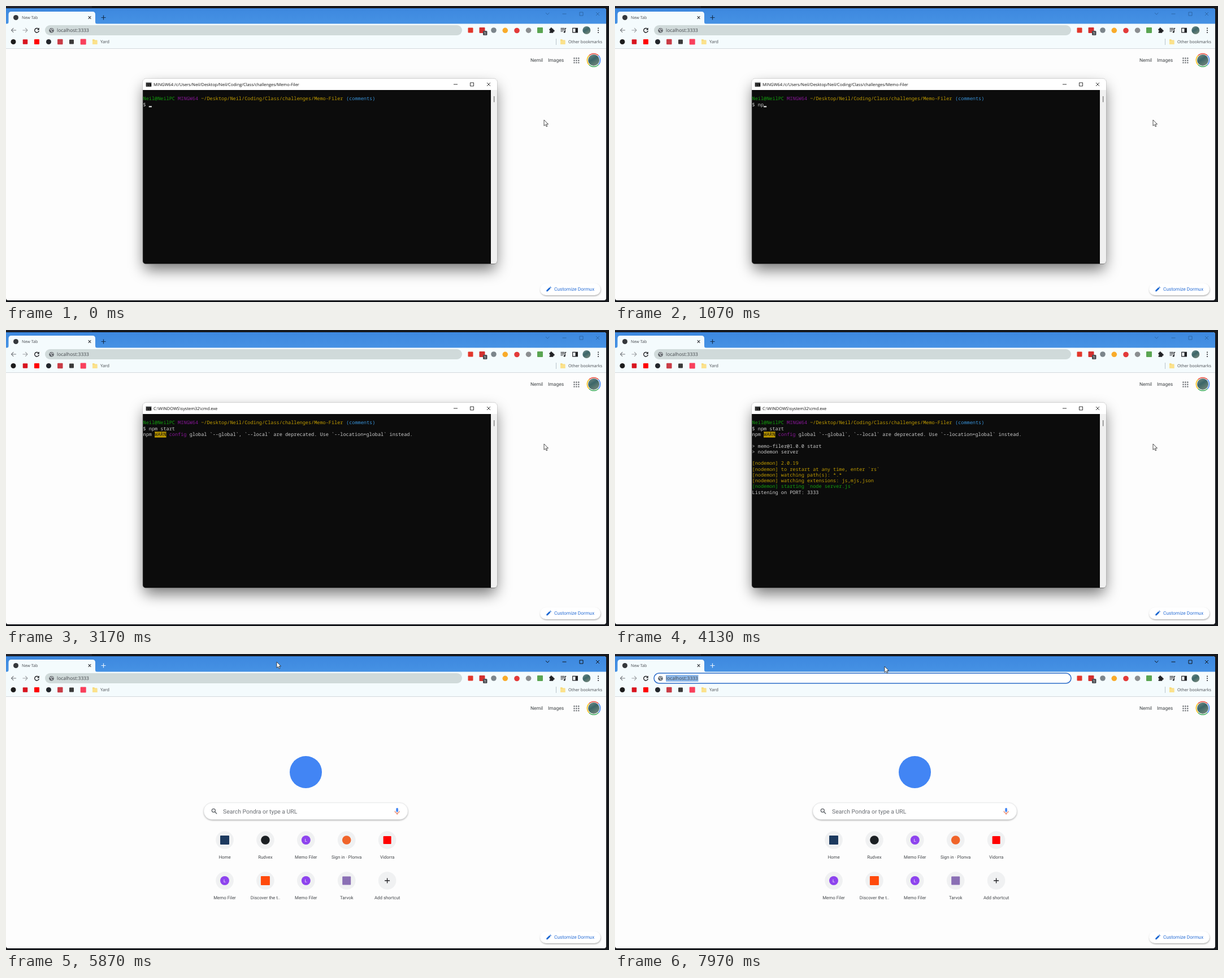
An HTML page that plays this animation: 1067x525 px, repeating every 8 s.

```html
<!DOCTYPE html>
<html lang="en">
<head>
<meta charset="utf-8">
<title>Terminal and browser</title>
<style>
html, body { margin: 0; width: 100%; height: 100%; overflow: hidden; background: #16181c; }
svg { display: block; width: 1067px; height: 525px; }
text { white-space: pre; text-rendering: geometricPrecision; }
.ui { font-family: "Open Sans", "Noto Sans", sans-serif; }
.page { font-family: Roboto, Arial, sans-serif; }
.mono { font: 8.56px "Noto Sans Mono", "DejaVu Sans Mono", monospace; }
</style>
</head>
<body>
<svg id="stage" viewBox="0 0 1067 525"></svg>
<script>
const LOOP = 8000;
const ENTER = 2350, FRONT = 5560, FOCUS = 7200;
const COL = 5.136, ROW = 10.28, LEFT = 242.5, BASE = 167.4;
const GREEN = '#13a10e', PURPLE = '#881798', YELLOW = '#c19c00', BLUE = '#3a96dd', WHITE = '#cccccc';

const rect = (x, y, w, h, fill, r = 0, more = '') =>
  `<rect x="${x}" y="${y}" width="${w}" height="${h}" rx="${r}" fill="${fill}" ${more}/>`;
const disc = (x, y, r, fill, more = '') =>
  `<circle cx="${x}" cy="${y}" r="${r}" fill="${fill}" ${more}/>`;
const line = (d, stroke, w = 1, more = '') =>
  `<path d="${d}" fill="none" stroke="${stroke}" stroke-width="${w}" ${more}/>`;
const shape = (d, fill, more = '') => `<path d="${d}" fill="${fill}" ${more}/>`;
const text = (x, y, s, size, fill, cls = 'ui', more = '') =>
  `<text x="${x}" y="${y}" font-size="${size}" fill="${fill}" class="${cls}" ${more}>${s}</text>`;
const square = (x, y, size, fill) => rect(x - size / 2, y - size / 2, size, size, fill, 1);
const group = (id, body) => `<g id="${id}">${body}</g>`;

const defs = `<defs>
  <linearGradient id="photo" x2=".6" y2="1">
    <stop offset="0" stop-color="#77918c"/><stop offset=".5" stop-color="#3c6668"/><stop offset="1" stop-color="#6d8378"/>
  </linearGradient>
  <linearGradient id="bar" y2="1" x2="0">
    <stop offset="0" stop-color="#3d88df"/><stop offset="1" stop-color="#4692e4"/>
  </linearGradient>
  <filter id="deep" x="-20%" y="-20%" width="140%" height="150%"><feGaussianBlur stdDeviation="13"/></filter>
  <filter id="soft" x="-10%" y="-40%" width="120%" height="190%"><feGaussianBlur stdDeviation="1.5"/></filter>
</defs>`;

function folder(x) {
  return shape(`M${x - 4} 59.2h3.2l1.2 1.2h4v7.6h-8.4z`, '#f6d773') + rect(x - 4, 61.2, 8.4, 6.8, '#fbe28c', .5);
}

function winButtons(color) {
  return line('M955 12l3.2 3.2 3.2-3.2M984.5 14h7M1015 11h6v6h-6zM1044 11l6 6M1050 11l-6 6', color, 1);
}

function toolbarIcons() {
  const dark = '#202124';
  return square(822, 43, 9, '#e2372b') +
    square(842.5, 43, 10, '#d3302f') + rect(844, 44, 7.5, 8, '#4a4d52', 1.5) +
    text(847.8, 50.6, '1', 7, '#fff', 'page', 'text-anchor="middle"') +
    disc(863, 43, 4.8, '#7c858b') + disc(883.3, 43.3, 4.8, '#f9ab2a') + disc(904, 43.5, 4.8, '#e33a3a') +
    disc(924.6, 43.2, 4.8, '#8b8e90') + square(945, 43, 10, '#5aa552') +
    rect(961.5, 40.3, 7, 7.4, dark, 1) + disc(964.8, 39.9, 1.7, dark) + disc(969, 44, 1.7, dark) +
    disc(961.6, 44.4, 1.2, '#f4fbfc') +
    line('M981.5 39.7h6.5M981.5 42.3h6.5M981.5 45h4M989.3 46V39.6h2', dark, 1.2) + disc(988.2, 46, 1.6, dark) +
    line('M1002.7 39.3h8.6v7.6h-8.6z', dark, 1.2) + rect(1007.5, 39, 4, 8, dark) +
    disc(1027.3, 43, 7, 'url(#photo)') +
    [39.5, 43.2, 46.9].map(y => disc(1048, y, 1, dark)).join('');
}

function bookmarks() {
  return disc(13, 63.5, 4.5, '#1c1c1c') + square(34, 63.5, 8.5, '#d8141f') + square(54.5, 63.5, 9, '#f00') +
    disc(75.5, 63.5, 4.5, '#22252b') + square(95.8, 63.5, 9.5, '#c93c46') + square(116, 63.5, 8, '#3a3a3a') +
    square(136.7, 63.5, 10, '#f9405c') + folder(157) +
    text(167, 66.3, 'Yard', 7.7, '#45494e') +
    rect(973, 58, 1, 11, '#b9c4cb') + folder(985) + text(995, 66.2, 'Other bookmarks', 7.3, '#45494e');
}

function frame() {
  const grey = '#5f6368';
  return rect(0, 0, 1067, 525, '#16181c') + rect(0, 0, 152, 3, '#24252e') +
    shape('M0 4H1058q4 0 4 4V518q0 4-4 4H4q-4 0-4-4z', '#fdfdfd') +
    shape('M0 4H1058q4 0 4 4V32H0z', 'url(#bar)') +
    rect(0, 31.5, 1062, 43.5, '#f4fbfd') + rect(0, 75, 1062, 1, '#d3d9dd') +
    shape('M1 32q3.5 0 3.5-4V15q0-5 5-5H153q5 0 5 5v13q0 4 3.5 4z', '#f4fbfd') +
    disc(17.5, 20.5, 4.5, '#35383c') + text(28, 23.1, 'New Tab', 7.15, '#45494e') +
    line('M145.7 18.2l4.6 4.6M150.3 18.2l-4.6 4.6', '#303338', 1.1) +
    line('M18 43H9.5M13.3 39.2L9.5 43l3.8 3.8', '#74787d', 1.1) +
    line('M29.5 43H38M34.2 39.2L38 43l-3.8 3.8', '#9a9ea2', 1.1) +
    line('M57.3 40.6a3.8 3.8 0 1 0 1 3.2', '#202124', 1.4) + shape('M58.8 38.6v3.9h-3.9z', '#202124') +
    rect(69, 34, 738, 18, '#d0dada', 9, 'id="pill"') +
    rect(90, 37, 57.5, 12, '#8db7e8', 0, 'id="marked"') +
    disc(80.5, 43.2, 4.3, grey) + line('M77.5 41.2q2 .2 2.3 2t2.4 2.8M81 39.6q-.6 2 2.8 2.4', '#dfe5e6', 1.2) +
    text(90, 46, 'localhost:3333', 8.45, '#404448') +
    toolbarIcons() + bookmarks() +
    text(928, 99, 'Nemil', 8.5, '#3c4043', 'page') + text(959, 99, 'Images', 8.5, '#3c4043', 'page') +
    Array.from({ length: 9 }, (_, i) =>
      rect(1004.4 + i % 3 * 3.9, 91.6 + Math.floor(i / 3) * 3.9, 2.2, 2.2, grey, .4)).join('') +
    ['#ea4335', '#4285f4', '#34a853', '#fbbc04'].map((c, i) =>
      line('M1031.8 87.8A11.6 11.6 0 0 1 1048.2 87.8', c, 1.5, `transform="rotate(${i * 90} 1040 96)"`)).join('') +
    disc(1040, 96, 10, 'url(#photo)') +
    rect(946, 494, 106, 20, '#0006', 10, 'filter="url(#soft)"') + rect(945, 492, 107, 21, '#fff', 10.5) +
    shape('M956.3 506.2v-2l5.3-5.3 2 2-5.3 5.3zM962.2 498.3l.9-.9 2 2-.9.9z', '#1a67d2') +
    text(970, 505.2, 'Customize Dormux', 8.4, '#2a6fd6', 'page');
}

function shortcuts() {
  const violet = '#8e44ee';
  const letter = (x, y) => disc(x, y, 8, violet) +
    text(x, y + 2.6, 'L', 7.4, '#fff', 'page', 'text-anchor="middle"');
  const box = (color, size = 15) => (x, y) => square(x, y, size, color);
  const dot = color => (x, y) => disc(x, y, 7.8, color);
  const items = [
    ['Home', box('#1d3a5f', 16)], ['Rudvex', dot('#1b1f23')], ['Memo Filer', letter],
    ['Sign in · Plonva', dot('#f0642a')], ['Vidorra', box('#f00', 14)],
    ['Memo Filer', letter], ['Discover the t..', box('#ff4a0c', 16)], ['Memo Filer', letter],
    ['Tarvok', box('#8a6fb4')],
    ['Add shortcut', (x, y) => line(`M${x - 4.5} ${y}h9M${x} ${y - 4.5}v9`, '#202124', 1.3)]
  ];
  return items.map(([name, icon], i) => {
    const x = 387 + i % 5 * 71.9, y = 330 + Math.floor(i / 5) * 72;
    return disc(x, y, 15.8, '#f0f1f2') + icon(x, y) +
      text(x, y + 33, name, 7.9, '#45484c', 'page', 'text-anchor="middle"');
  }).join('');
}

function newTab() {
  return disc(530.5, 209.5, 28.5, '#4285f4') +
    rect(350, 265, 361, 30, '#0005', 15, 'filter="url(#soft)"') +
    rect(350, 264, 361, 29.5, '#fff', 14.7, 'stroke="#e4e6e8" stroke-width=".6"') +
    disc(367.3, 277.6, 3, 'none', 'stroke="#5f6368" stroke-width="1.3"') + line('M369.5 279.8l3.6 3.6', '#5f6368', 1.4) +
    text(384, 282.7, 'Search Pondra or type a URL', 10.4, '#6a6e73', 'page') +
    rect(690.3, 273, 3.6, 7.4, '#4285f4', 1.8) +
    line('M688.3 278.4a3.8 3.8 0 0 0 7.6 0M692.1 282.2v2.8', '#e0603f', 1.1) +
    shortcuts();
}

// Each row: time shown, row number, runs of text and colour.
const rows = [
  [0, 0, ['Neil@NeilPC', GREEN], [' MINGW64', PURPLE],
    [' ~/Desktop/Neil/Coding/Class/challenges/Memo-Filer', YELLOW], [' (comments)', BLUE]],
  [0, 1, ['$ ', WHITE]],
  [2800, 2, ['npm ', WHITE], ['WARN', '#0c0c0c', YELLOW], [' config', PURPLE],
    [' global `--global`, `--local` are deprecated. Use `--location=global` instead.', WHITE]],
  [3250, 4, ['&gt; memo-filer@1.0.0 start', WHITE]],
  [3250, 5, ['&gt; nodemon server', WHITE]],
  [3600, 7, ['[nodemon] 2.0.19', YELLOW]],
  [3600, 8, ['[nodemon] to restart at any time, enter `rs`', YELLOW]],
  [3600, 9, ['[nodemon] watching path(s): *.*', YELLOW]],
  [3600, 10, ['[nodemon] watching extensions: js,mjs,json', YELLOW]],
  [3600, 11, ['[nodemon] starting `node server.js`', GREEN]],
  [3900, 12, ['Listening on PORT: 3333', WHITE]]
];

function terminalRow([time, row, ...runs]) {
  let col = 0;
  const y = BASE + row * ROW;
  const body = runs.map(([s, color, back]) => {
    const x = LEFT + col * COL;
    col += s.length;
    return (back ? rect(x, y - 7.6, s.length * COL, ROW, back) : '') +
      `<text x="${x}" y="${y}" class="mono" fill="${color}">${s}</text>`;
  }).join('');
  return `<g class="row" data-time="${time}">${body}</g>`;
}

function terminal() {
  return rect(244, 142, 623, 326, '#0008', 8, 'filter="url(#deep)"') +
    rect(242, 129, 627, 328.5, '#0c0c0c', 5, 'stroke="#8a8a8a" stroke-width=".5"') +
    shape('M242 149V134q0-5 5-5H864q5 0 5 5v15z', '#fff') +
    shape('M858 149h11v303q0 5-5 5h-6z', '#f0f0f0') + rect(863, 160, 1.3, 10.5, '#777') +
    rect(247.7, 135.2, 9.6, 7.8, '#111', .5) + rect(247.7, 135.2, 9.6, 1.4, '#b5b8ba') +
    text(248.8, 141.6, 'C:\\', 4.5, '#eee') +
    text(261, 141.8, '', 7.42, '#111', 'ui', 'id="caption"') +
    line('M792 139h7M821.5 136h6v6h-6zM851 136l6 6M857 136l-6 6', '#222', .9) +
    rows.map(terminalRow).join('') +
    `<text id="typed" x="${LEFT + 2 * COL}" y="${BASE + ROW}" class="mono" fill="${WHITE}"></text>` +
    rect(0, 0, COL, 2, '#f2f2f2', 0, 'id="caret"');
}

function pointers() {
  return group('arrow', shape('M0 0V10.5L2.5 8.3 4.2 12 5.8 11.3 4.2 7.6H7.5z', '#fff',
      'stroke="#222" stroke-width=".8" stroke-linejoin="round"')) +
    group('beam', line('M-2-4.5q2 0 2 1.2v6.6q0 1.2-2 1.2M2-4.5q-2 0-2 1.2M0 3.3q0 1.2 2 1.2', '#333', .9));
}

document.getElementById('stage').innerHTML = defs + frame() +
  group('dim', winButtons('#2c67a8') + line('M168.5 20.5h8M172.5 16.5v8', '#14304f', 1.2)) +
  group('lit', winButtons('#101418') + line('M168.5 20.5h8M172.5 16.5v8', '#eaf3fd', 1.2)) +
  group('home', newTab()) + group('terminal', terminal()) + pointers();

const el = Object.fromEntries([...document.querySelectorAll('[id]')].map(e => [e.id, e]));
const rowEls = [...document.querySelectorAll('.row')];
const show = (e, on) => e.setAttribute('visibility', on ? 'inherit' : 'hidden');
const set = (e, values) => { for (const k in values) e.setAttribute(k, values[k]); };

const command = 'npm start';
const keyTimes = [900, 1020, 1130, 1260, 1400, 1510, 1630, 1750, 1880];
const track = [[0, 952, 202], [4450, 952, 202], [5200, 479, 14], [6150, 479, 14],
  [6600, 473, 41], [7450, 473, 41], [7880, 477, 22], [LOOP, 477, 22]];

function pointerAt(t) {
  const i = track.findIndex(p => p[0] > t);
  const [t0, x0, y0] = track[i - 1], [t1, x1, y1] = track[i];
  const k = (t - t0) / (t1 - t0), e = k * k * (3 - 2 * k);
  return [x0 + (x1 - x0) * e, y0 + (y1 - y0) * e];
}

function draw(t) {
  const front = t >= FRONT, focus = t >= FOCUS;
  show(el.terminal, !front);
  show(el.home, front);
  show(el.dim, !front);
  show(el.lit, front);

  rowEls.forEach(r => show(r, t >= +r.dataset.time));
  const count = keyTimes.filter(k => k <= t).length;
  el.typed.textContent = command.slice(0, count);
  el.caption.textContent = t < 2800
    ? 'MINGW64:/c/Users/Neil/Desktop/Neil/Coding/Class/challenges/Memo-Filer'
    : 'C:\\WINDOWS\\system32\\cmd.exe';
  const entered = t >= ENTER;
  set(el.caret, {
    x: LEFT + (entered ? 0 : 2 + count) * COL,
    y: BASE + ROW * (entered ? 2 : 1) - .2
  });
  show(el.caret, t < 2550 && (t + 280) % 1060 < 530);

  const [x, y] = pointerAt(t);
  const overBar = x > 69 && x < 807 && y > 34 && y < 52;
  for (const p of [el.arrow, el.beam]) set(p, { transform: `translate(${x} ${y})` });
  show(el.arrow, !overBar);
  show(el.beam, overBar);

  set(el.pill, focus
    ? { fill: '#fff', stroke: '#2b6cc9', 'stroke-width': 1.5 }
    : { fill: overBar ? '#cbd0d3' : '#d0dada', stroke: 'none' });
  show(el.marked, focus);
}

const start = performance.now();
function tick() {
  draw((performance.now() - start) % LOOP);
  requestAnimationFrame(tick);
}
tick();
</script>
</body>
</html>
```
